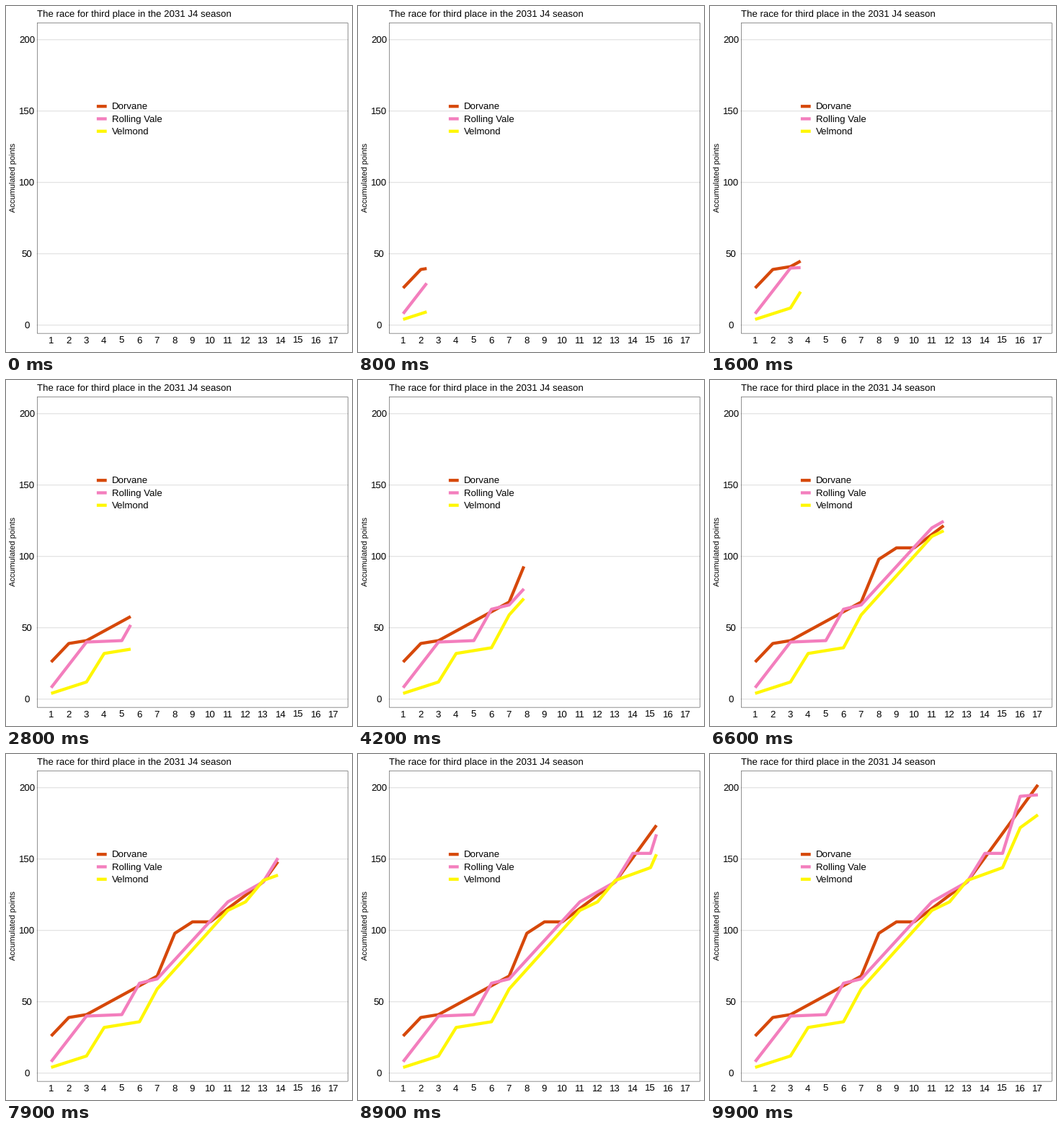
A matplotlib script for the animation above (10000 ms loop, 480 px wide and 480 px high).

```python
import numpy as np
import matplotlib.pyplot as plt
from matplotlib.animation import FuncAnimation
from matplotlib.patches import Rectangle

SIZE, DPI = 480, 72
FRAMES, INTERVAL = 100, 100
LEFT, RIGHT, TOP, BOTTOM = 43.0, 474.5, 23.2, 454.4
LINE_W, EDGE_W = 4.27, 0.53

plt.rcParams["font.family"] = "Liberation Sans"
plt.rcParams["text.hinting"] = "none"
plt.rcParams["path.snap"] = False

# Turning points {round: points}; scores run straight between them.
TEAMS = [
    ("Dorvane", "#D6480A",
     {1: 26, 2: 39, 3: 41, 7: 68, 8: 98, 9: 106, 10: 106, 13: 134, 17: 202}),
    ("Rolling Vale", "#F37EBD",
     {1: 8, 3: 40, 5: 41, 6: 63, 7: 66, 11: 120, 13: 134, 14: 154, 15: 154,
      16: 194, 17: 195}),
    ("Velmond", "#FFF700",
     {1: 4, 3: 12, 4: 32, 6: 36, 7: 59, 11: 114, 12: 120, 13: 135, 15: 144,
      16: 172, 17: 181}),
]
ROUNDS = np.arange(1, 18)
# Each round is reached on a whole frame; the lines grow evenly in between.
ARRIVAL = np.round((FRAMES - 1) * (ROUNDS - 1) / 16)


def px(r):
    return LEFT + (r - 0.2) * (RIGHT - LEFT) / 17.6


def py(v):
    return BOTTOM - (v + 5.9) * (BOTTOM - TOP) / 217.8


def score(r, turns):
    return np.interp(r, list(turns), list(turns.values()))


fig = plt.figure(figsize=(SIZE / DPI, SIZE / DPI), dpi=DPI, facecolor="white")
ax = fig.add_axes([0, 0, 1, 1])
ax.set_xlim(0, SIZE)
ax.set_ylim(SIZE, 0)
ax.axis("off")


def label(x, y, text, size=13.2, **kw):
    ax.text(x, y, text, fontsize=size, color="black", va="baseline", **kw)


label(43, 14.8, "The race for third place in the 2031 J4 season")
label(14, 238.2, "Accumulated points", 11, ha="center",
      rotation=90, rotation_mode="anchor")

for v in range(0, 201, 50):
    ax.plot([LEFT, RIGHT], [py(v)] * 2, color="#DEDEDE", lw=1.07, zorder=1)
    label(29, py(v) + 4.4, str(v), ha="center")
for r in ROUNDS:
    label(px(r) - 0.3, 468, str(r), ha="center")

lines = []
for i, (name, color, _) in enumerate(TEAMS):
    style = dict(color=color, lw=LINE_W, solid_capstyle="butt",
                 solid_joinstyle="round", zorder=2 + i)
    y = 139.2 + 17.28 * i
    ax.plot([125.9, 139.7], [y, y], **style)
    label(147, y + 4.6, name)
    lines.append(ax.plot([], [], **style)[0])

ax.add_patch(Rectangle((LEFT + EDGE_W / 2, TOP + EDGE_W / 2),
                       RIGHT - LEFT - EDGE_W, BOTTOM - TOP - EDGE_W,
                       fill=False, ec="#333333", lw=EDGE_W, zorder=6))


def update(k):
    now = np.interp(k, ARRIVAL, ROUNDS)
    xs = np.append(ROUNDS[ROUNDS < now], now) if k else np.array([])
    for line, (_, _, turns) in zip(lines, TEAMS):
        line.set_data(px(xs), py(score(xs, turns)))
    return lines


anim = FuncAnimation(fig, update, frames=FRAMES, interval=INTERVAL,
                     repeat=True, repeat_delay=0)
plt.show()
```
